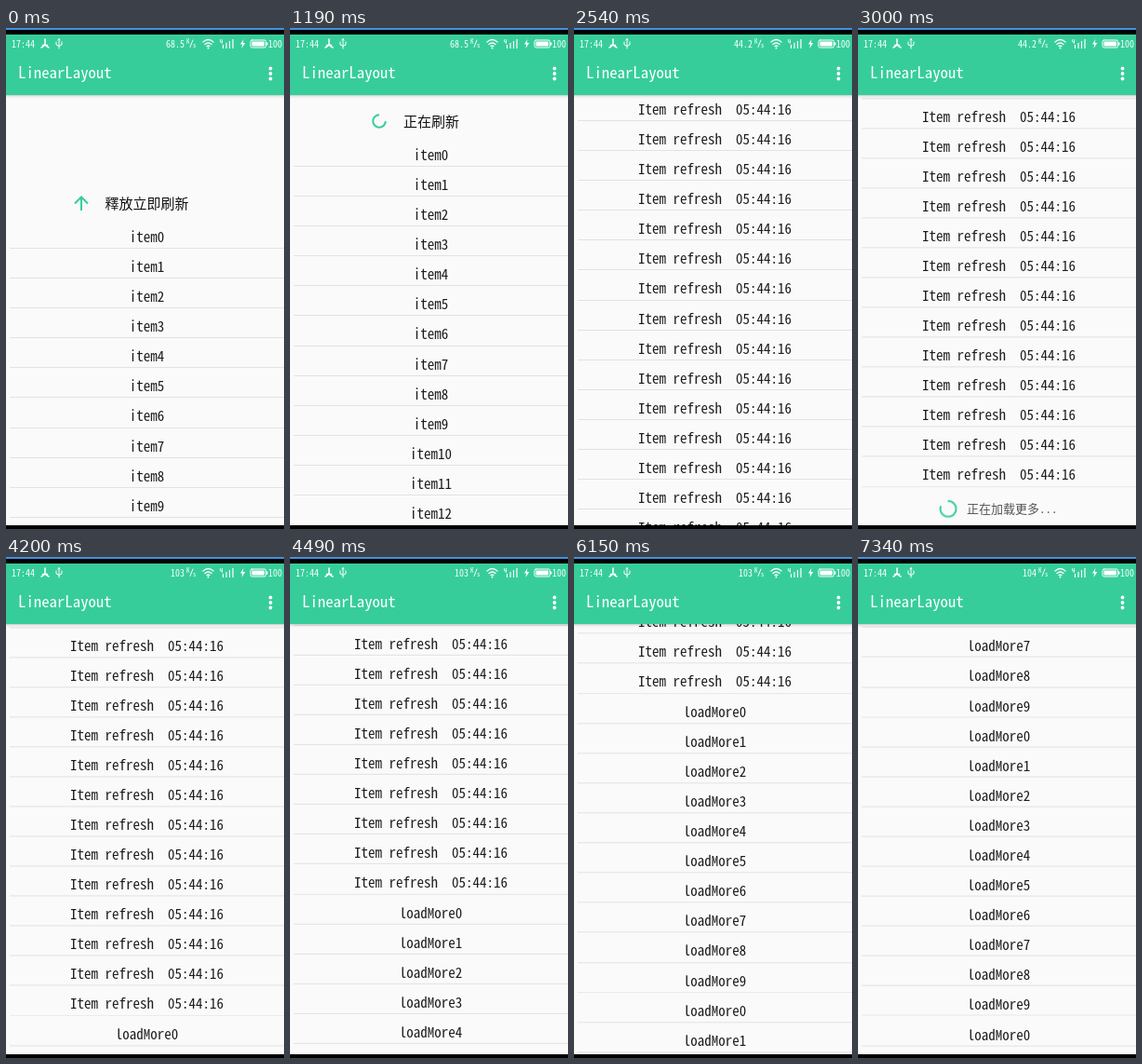
An HTML page that plays this animation: 299x538 px, repeating every 8 s.

```html
<!DOCTYPE html>
<html lang="zh">
<head>
<meta charset="utf-8">
<title>LinearLayout</title>
<style>
:root { --green: #36cd9b; --paper: #fafafa; }
html, body { margin: 0; width: 100%; height: 100%; overflow: hidden; background: #000; }
body { font: 15px "Noto Sans Mono CJK SC", "Noto Sans CJK SC", "Noto Sans CJK", monospace; color: #1c1c1c; }
.stage { position: relative; width: 299px; height: 538px; overflow: hidden; background: #000; }
.view { position: absolute; top: 71px; left: 0; width: 299px; height: 463px; overflow: hidden; background: var(--paper); }
.bar { position: absolute; top: 0; left: 0; }
.shade { position: absolute; top: 71px; left: 0; width: 299px; height: 5px; background: linear-gradient(#0004, #0001 50%, #0000); }

/* The list origin is 19px above the middle of its first row. */
.list { position: absolute; top: -90px; left: 0; width: 299px; animation: scroll 8s infinite; }
.layer { position: absolute; top: 0; left: 0; width: 299px; background: var(--paper); }
.row { position: relative; height: 32.09px; line-height: 38px; margin-left: 4px; text-align: center; white-space: pre; }
.row::after { content: ""; position: absolute; left: 0; right: 0; bottom: 0; height: 1px; background: #e2e2e2; }
.head { position: absolute; top: -41px; left: 0; width: 299px; height: 41px; line-height: 48px; background: var(--paper); font-weight: 500; color: #111; }
.head span, .foot span { position: absolute; white-space: pre; }
.foot { position: relative; height: 46px; line-height: 46px; font-size: 13px; color: #555; background: var(--paper); }
.foot span { left: 117px; }
svg { display: block; }
.icon { position: absolute; overflow: visible; fill: none; stroke: var(--green); stroke-width: 2; }
.spin { animation: spin 1s linear infinite; }

.busy, .fresh, .more1, .more2, .more3, .rate2, .rate3 { animation: 8s step-end infinite; }
.busy { animation-name: busy; }
.fresh { animation-name: fresh; }
.more1 { animation-name: more1; }
.more2 { animation-name: more2; }
.more3 { animation-name: more3; }
.rate2 { animation-name: rate2; }
.rate3 { animation-name: rate3; }

@keyframes spin { to { transform: rotate(360deg); } }
@keyframes busy { 0% { visibility: hidden; } 1.625%, to { visibility: visible; } }
@keyframes fresh { 0% { visibility: hidden; } 22.375%, to { visibility: visible; } }
@keyframes more1 { 0% { visibility: hidden; } 52.5%, to { visibility: visible; } }
@keyframes more2 { 0% { visibility: hidden; } 74.875%, to { visibility: visible; } }
@keyframes more3 { 0% { visibility: hidden; } 91.75%, to { visibility: visible; } }
@keyframes rate2 { 0% { visibility: hidden; } 45%, to { visibility: visible; } }
@keyframes rate3 { 0% { visibility: hidden; } 90%, to { visibility: visible; } }
@keyframes scroll {
  0%, 1.6% { transform: translateY(224px); animation-timing-function: cubic-bezier(.2, .5, .4, 1); }
  10%, 25% { transform: translateY(136px); animation-timing-function: linear; }
  26.1% { transform: translateY(135px); animation-timing-function: ease-out; }
  30.6%, 31.8% { transform: translateY(87px); animation-timing-function: cubic-bezier(.4, 0, .4, 1); }
  37.4%, 52.6% { transform: translateY(-129.6px); animation-timing-function: cubic-bezier(.4, 0, .3, 1); }
  62.8%, 75% { transform: translateY(-450.5px); animation-timing-function: cubic-bezier(.4, 0, .3, 1); }
  86.2%, to { transform: translateY(-771.4px); }
}
</style>
</head>
<body>
<div class="stage">
  <div class="view"><div class="list" id="list"></div></div>
  <div class="shade"></div>
  <svg class="bar" width="299" height="72" fill="#fff">
    <rect width="299" height="72" fill="#000"/>
    <rect width="299" height="2" fill="#3f93e0"/>
    <rect y="7" width="299" height="65" fill="#36cd9b"/>
    <text x="13" y="54" font-size="16.8">LinearLayout</text>
    <circle cx="284.500" cy="43.500" r="1.900"/>
    <circle cx="284.500" cy="49" r="1.900"/>
    <circle cx="284.500" cy="54.500" r="1.900"/>

    <g font-size="10">
      <text x="6" y="20.500">17:44</text>
      <text x="282" y="20.500">100</text>
      <g text-anchor="end">
        <text x="192" y="20.500">68.5</text>
        <g class="fresh"><rect x="170" y="10" width="23" height="14" fill="#36cd9b"/><text x="192" y="20.500">44.2</text></g>
        <g class="rate2"><rect x="170" y="10" width="23" height="14" fill="#36cd9b"/><text x="192" y="20.500">103</text></g>
        <g class="rate3"><rect x="170" y="10" width="23" height="14" fill="#36cd9b"/><text x="192" y="20.500">104</text></g>
      </g>
      <text x="194" y="17" font-size="7">K</text>
      <text x="201" y="20.500" font-size="7">s</text>
    </g>

    <g fill="none" stroke="#fff" stroke-linecap="round">
      <path d="M198 20.500L201 13"/>
      <path stroke-width="1.500" d="M42 12v5M42 17q-1 3-4 4M42 17q1 3 4 4M39.500 18.500h5"/>
      <path d="M57 12v10M54 15v3l3 1.500 3-1.500v-3M56 13l1-1.500 1 1.500"/>
      <path stroke-width="1.300" d="M212 15q5.500-5 11 0M214 17.500q3.500-3 7 0M216 19.500q1.500-1 3 0"/>
      <path stroke-width="1.200" stroke-linecap="butt" d="M233.500 18v4M237 16v6M240.500 14v8M244 12v10"/>
      <path stroke-width=".8" d="M230.500 12.500v2.500h2M232.500 12.500v4"/>
      <rect x="263" y="13" width="16.500" height="8" rx="1.500"/>
    </g>
    <circle cx="217.500" cy="21.500" r="1"/>
    <path d="M255.500 12l-3.500 5.500h2.300l-1 4.500 4-6h-2.500z"/>
    <path d="M264.500 14.500h13.500v5h-13.500zM280 15.500h1.500v3h-1.500z"/>
  </svg>
</div>
<script>
const rows = (count, label) =>
  Array.from({ length: count }, (_, i) => `<div class="row">${label(i)}</div>`).join("");

const spinner = (x, y, r, arc, delay) =>
  `<svg class="icon spin" style="left:${x - 10}px;top:${y - 10}px;animation-delay:${delay}s" width="20" height="20">
    <circle cx="10" cy="10" r="${r}" pathLength="100" stroke-dasharray="${arc} ${100 - arc}"/></svg>`;

const foot = `<div class="foot">${spinner(97, 23, 8.5, 82, -.74)}<span>正在加载更多...</span></div>`;
const head = (cls, x, text, icon = "") =>
  `<div class="head ${cls}">${icon}<span style="left:${x}px">${text}</span></div>`;
const arrow = `<svg class="icon" style="left:73px;top:16px" width="16" height="16">
  <path d="M8 16V1.500M1 8.500L8 1.500l7 7"/></svg>`;

const layer = (cls, start, body) =>
  `<div class="layer ${cls}" style="top:${start * 32.09}px">${body}${foot}</div>`;
const more = i => "loadMore" + i;

document.getElementById("list").innerHTML =
  layer("", 0, head("", 106.5, "釋放立即刷新", arrow)
    + head("busy", 122, "正在刷新", spinner(96, 24, 6.8, 75, -.81))
    + rows(20, i => "item" + i))
  + layer("fresh", 0, head("", 122, "刷新完成") + rows(20, () => "Item refresh  05:44:16"))
  + [1, 2, 3].map(n => layer("more" + n, 10 + n * 10, rows(10, more))).join("");
</script>
</body>
</html>
```
